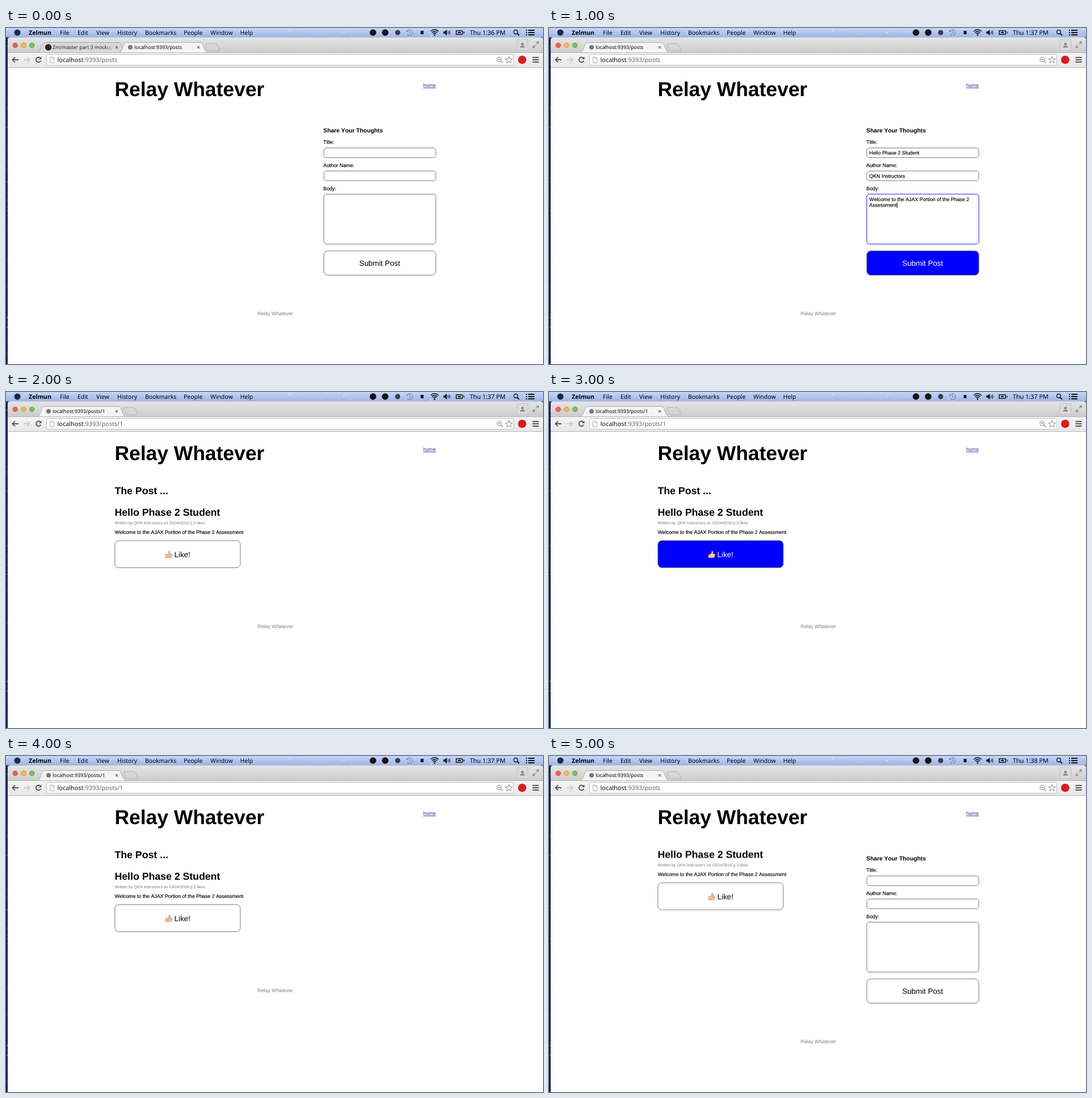
An HTML page that plays this animation: 946x592 px, repeating every 6 s.

```html
<!DOCTYPE html>
<html lang="en">
<head>
<meta charset="utf-8">
<title>Sharing a post</title>
<style>
  html, body { margin: 0; width: 100%; height: 100%; overflow: hidden; background: #fff; }
  svg { display: block; width: 946px; height: 592px; }
  text { text-rendering: geometricPrecision; font-kerning: none; }
  .ui { font: 10.4px "Noto Sans", "Open Sans", sans-serif; }
  .tab-text { font-size: 8.7px; }
  .url { font-size: 10.9px; fill: #666; }
  .url tspan { fill: #111; }
  .page { font: 8.86px "Liberation Sans", Arial, sans-serif; }
  .page text:not([class]) { stroke: #000; stroke-width: .18px; }
  .bold { font-weight: 700; }
  .h1 { font-size: 35.4px; }
  .h2 { font-size: 17.7px; }
  .h3 { font-size: 10.33px; }
  .button { font-size: 13.35px; }
  .meta { font-size: 7.08px; fill: #777; }
  .footer { fill: #7c7c7c; text-anchor: middle; }
  .link { fill: #551a8b; text-decoration: underline; }
  .box { fill: #fff; stroke: #777; }
  .line { fill: none; stroke: #111; }
</style>
</head>
<body>
<svg viewBox="0 0 946 592">
  <defs>
    <linearGradient id="menu" x2="0" y2="1">
      <stop stop-color="#c6d6f6"/><stop offset="1" stop-color="#9db4e6"/>
    </linearGradient>
    <linearGradient id="strip" x2="0" y2="1">
      <stop stop-color="#e6e6e6"/><stop offset="1" stop-color="#cccccc"/>
    </linearGradient>
    <linearGradient id="bar" x2="0" y2="1">
      <stop stop-color="#f4f4f4"/><stop offset="1" stop-color="#e8e8e8"/>
    </linearGradient>
    <linearGradient id="fade" gradientUnits="userSpaceOnUse" x1="176" x2="188">
      <stop stop-color="#222"/><stop offset="1" stop-color="#222" stop-opacity="0"/>
    </linearGradient>
    <path id="tab" d="M56 43C61 42.500 62 27 67 25.500H199C204 27 205 42.500 211 43"/>
    <path id="new-tab" d="M209 27.500H225Q228 28 229 31L232 38Q232 40 230 40H215Q212 40 211 37L207.500 29.500Q207 27.500 209 27.500Z" fill="#d6d6d6" stroke="#aaa" stroke-width=".8"/>
    <path id="close" d="M-2.200-2.200L2.200 2.200M2.200-2.200L-2.200 2.200" stroke="#666" stroke-width="1.200"/>
  </defs>

  <rect width="946" height="592" fill="#18244a"/>
  <g id="stars" fill="#fff"></g>
  <path d="M3 592V21Q3 16.500 8 16.500H941Q946 16.500 946 21V592Z" fill="#fff"/>

  <!-- menu bar -->
  <rect width="946" height="16.500" fill="url(#menu)"/>
  <g id="sparkles" fill="#fff"></g>
  <g class="ui" id="menu-items">
    <circle cx="20" cy="8" r="5.500" fill="#1c2944"/>
    <text x="40" y="11.800" class="bold" font-size="10.6">Zelmun</text>
    <text x="817" y="11.800" font-size="10.8" data-on="0">Thu 1:36 PM</text>
    <text x="817" y="11.800" font-size="10.8" data-on="1234">Thu 1:37 PM</text>
    <text x="817" y="11.800" font-size="10.8" data-on="5">Thu 1:38 PM</text>
  </g>
  <g fill="#111">
    <circle cx="646.500" cy="8" r="5.800"/>
    <circle cx="668" cy="8" r="5.800"/>
    <circle cx="690" cy="8" r="4.500" fill="#333c50"/>
    <rect x="730.500" y="5" width="5" height="6"/>
    <path d="M770.500 6H773L776.500 2.800V13.200L773 10H770.500Z"/>
    <path d="M792.500 4H803.500Q805 4 805 5.500V10.500Q805 12 803.500 12H792.500ZM806 6.500H807.500V9.500H806Z"/>
    <path d="M794 5.500H803.500V10.500H794Z" fill="#c4d1ee"/>
    <path d="M796 7H799V6L802 8L799 10V9H796Z"/>
    <circle cx="755" cy="12.500" r="1.300"/>
    <path d="M916 3H918V5H916ZM920 3H931V5H920ZM916 7H918V9H916ZM920 7H931V9H920ZM916 11H918V13H916ZM920 11H931V13H920Z"/>
  </g>
  <g class="line">
    <path d="M706.300 6A5.200 5.200 0 1 1 707 11.500M711 5V8.200L713.300 9.800M704.500 4.500L706.300 6.800L708.500 5.200" stroke="#66728f"/>
    <path d="M748 6Q755-.5 762 6M750.200 8.200Q755 3.800 759.800 8.200M752.400 10.300Q755 8 757.600 10.300" stroke-width="1.500"/>
    <path d="M778.500 6Q780 8 778.500 10M780.500 4.500Q783 8 780.500 11.500" stroke-width="1.200"/>
    <circle cx="898" cy="7" r="3.500" stroke-width="1.400"/>
    <path d="M900.500 9.500L904 13" stroke-width="1.800"/>
  </g>

  <!-- tab strip -->
  <path d="M3 43.500V21Q3 16.500 8 16.500H941Q946 16.500 946 21V43.500Z" fill="url(#strip)"/>
  <g stroke-width=".7">
    <circle cx="16.200" cy="30.500" r="4.300" fill="#ee6156" stroke="#b8443c"/>
    <circle cx="31" cy="30.500" r="4.300" fill="#f3b94d" stroke="#b98830"/>
    <circle cx="45.700" cy="30.500" r="4.300" fill="#74c455" stroke="#4c8f36"/>
  </g>
  <rect x="900.500" y="20.500" width="19" height="19" fill="#dcdcdc" stroke="#c3c3c3"/>
  <path d="M905.500 34.500Q905.500 31 909.800 31Q914 31 914 34.500Z" fill="#888"/>
  <circle cx="909.800" cy="28.300" r="2.300" fill="#888"/>
  <path d="M934 28.500L938 24.500M934.500 24.500H938V28M932.500 30.500L928.500 34.500M928.500 31V34.500H932" fill="none" stroke="#8b8b8b" stroke-width="1.300"/>
  <path d="M3 43.500H946" stroke="#b4b4b4"/>
  <g class="ui tab-text" data-on="0">
    <use href="#tab" fill="#d9d9d9" stroke="#aaa"/>
    <circle cx="74.500" cy="34" r="5.700" fill="#222"/>
    <text x="82" y="37" fill="url(#fade)">Zm/master part 3 mockup</text>
    <use href="#close" x="195" y="34"/>
  </g>
  <g id="active-tab" class="ui tab-text">
    <use href="#tab" fill="#f4f4f4" stroke="#aaa"/>
    <circle cx="75" cy="34" r="4" fill="#777"/>
    <text x="82" y="37" data-on="015">localhost:9393/posts</text>
    <text x="82" y="37" data-on="234">localhost:9393/posts/1</text>
    <use href="#close" x="195" y="34"/>
    <use href="#new-tab"/>
  </g>

  <!-- toolbar -->
  <rect x="3" y="44" width="943" height="25" fill="url(#bar)"/>
  <path d="M3 69.500H946" stroke="#b4b4b4"/>
  <rect x="71.500" y="46.500" width="823" height="19" rx="2" fill="#fff" stroke="#bdbdbd"/>
  <g fill="none" stroke="#555" stroke-width="1.900">
    <path d="M22 56H11.500M16 51.300L11.300 56L16 60.700"/>
    <path d="M31 56H41.500M37 51.300L41.700 56L37 60.700" stroke="#ccc"/>
    <path d="M61 53.500A4.400 4.400 0 1 0 61.400 57.500"/>
    <path d="M927.500 52H938.500M927.500 56H938.500M927.500 60H938.500"/>
  </g>
  <path d="M62.500 50.500V55H58Z" fill="#555"/>
  <path d="M77.500 51H82L85 54V61.500H77.500ZM82 51V54H85" fill="none" stroke="#aaa"/>
  <g fill="none" stroke="#888">
    <circle cx="868.800" cy="55.300" r="4"/><path d="M867 55.300H870.600M871.800 58.300L875 61.500" stroke-width="1.500"/>
    <path d="M886 50L887.800 54.100L892.200 54.500L888.900 57.400L889.900 61.700L886 59.400L882.100 61.700L883.100 57.400L879.800 54.500L884.200 54.100Z"/>
  </g>
  <circle cx="909.300" cy="56" r="7.300" fill="#d51f1b"/>
  <g class="ui">
    <text x="90.500" y="60" class="url" data-on="015"><tspan>localhost</tspan>:9393/posts</text>
    <text x="90.500" y="60" class="url" data-on="234"><tspan>localhost</tspan>:9393/posts/1</text>
  </g>

  <!-- page -->
  <g class="page">
    <text x="191.500" y="120" class="bold h1">Relay Whatever</text>
    <text x="735" y="104.200" class="link">home</text>

    <g data-on="015">
      <text x="559" y="183.700" class="bold h3">Share Your Thoughts</text>
      <text x="559" y="204.300">Title:</text>
      <rect class="box" x="559.800" y="211.300" width="197.400" height="17" rx="4.500"/>
      <text x="559" y="245">Author Name:</text>
      <rect class="box" x="559.800" y="252" width="197.400" height="17" rx="4.500"/>
      <text x="559" y="285.700">Body:</text>
      <rect class="box" id="body-box" x="559.800" y="292.700" width="197.400" height="88" rx="4.500"/>
      <rect class="box" id="submit-box" x="559.800" y="392.700" width="197.400" height="42.800" rx="7"/>
      <text id="submit-label" x="622.300" y="419" class="button">Submit Post</text>
      <g data-on="1">
        <text x="564.300" y="223.200">Hello Phase 2 Student</text>
        <text x="564.300" y="264">QKN Instructors</text>
        <text x="564.300" y="305">Welcome to the AJAX Portion of the Phase 2</text>
        <text x="564.300" y="315.300">Assessment</text>
        <path d="M613.300 307V317" stroke="#000" stroke-width=".9"/>
      </g>
      <text x="474.500" y="506.200" class="footer">Relay Whatever</text>
    </g>

    <g data-on="234">
      <text x="191.500" y="180" class="bold h2">The Post ...</text>
      <text x="474.500" y="416" class="footer">Relay Whatever</text>
    </g>

    <g id="post">
      <g data-on="2345">
        <text x="191.500" y="218.300" class="bold h2">Hello Phase 2 Student</text>
        <text x="191.500" y="233.200" class="meta" data-on="23">Written by QKN Instructors on 03/24/2016 || 0 likes</text>
        <text x="191.500" y="233.200" class="meta" data-on="45">Written by QKN Instructors on 03/24/2016 || 2 likes</text>
        <text x="191.500" y="250">Welcome to the AJAX Portion of the Phase 2 Assessment</text>
        <rect class="box" id="like-box" x="191.800" y="261.800" width="221" height="47.800" rx="7"/>
        <path id="thumb" d="M281 286.300H284Q286.800 284.300 287 280.800Q287.300 279.800 288.500 280.400Q289.800 281.600 288.700 285.300H291.700Q293 286 292.200 287.300Q292.800 288.500 291.800 289.200Q292 290.500 291 290.800Q290.800 292 289.500 292H281Z" fill="#e9bd97" stroke="#b07f5b" stroke-width=".7"/>
        <text id="like-label" x="296.500" y="290.900" class="button">Like!</text>
      </g>
    </g>
  </g>
</svg>

<script>
const STEPS = [0, 1, 2, 3, 4, 5];
const STEP_MS = 1000;
const $ = selector => document.querySelector(selector);

function svg(parent, tag, attrs, text = '') {
  const el = document.createElementNS(parent.namespaceURI, tag);
  for (const name in attrs) el.setAttribute(name, attrs[name]);
  el.textContent = text;
  parent.append(el);
}

// Holds one value per step, with a hard change between steps.
function track(el, property, valueAt) {
  const count = STEPS.length;
  const frames = STEPS.map(step => ({
    [property]: valueAt(step), offset: step / count, easing: 'steps(1, end)'
  }));
  frames.push({ [property]: valueAt(count - 1), offset: 1 });
  el.animate(frames, { duration: count * STEP_MS, iterations: Infinity });
}

function highlight(selector, property, step, active, normal) {
  track($(selector), property, s => s === step ? active : normal);
}

let seed = 7;
const random = () => (seed = seed * 16807 % 2147483647) / 2147483647;

function scatter(parent, count, x, width, height, opacity) {
  for (let i = 0; i < count; i++) {
    svg(parent, 'circle', {
      cx: x + random() * width, cy: random() * height,
      r: 0.4 + random() * 0.8, opacity: random() * opacity
    });
  }
}
scatter($('#stars'), 40, 0, 3, 592, 0.4);
scatter($('#sparkles'), 90, 420, 400, 16, 0.6);

const menu = { File: 95, Edit: 126, View: 159, History: 196, Bookmarks: 245, People: 313, Window: 360, Help: 412.5 };
for (const label in menu) svg($('#menu-items'), 'text', { x: menu[label], y: 11.8 }, label);

for (const el of document.querySelectorAll('[data-on]')) {
  track(el, 'opacity', step => el.dataset.on.includes(step) ? 1 : 0);
}
track($('#active-tab'), 'transform', step => `translateX(${step === 0 ? 144 : 0}px)`);
track($('#post'), 'transform', step => `translateY(${step === 5 ? -38.5 : 0}px)`);

highlight('#body-box', 'stroke', 1, '#2020e8', '#777');
highlight('#submit-box', 'fill', 1, '#0000ff', '#fff');
highlight('#submit-label', 'fill', 1, '#fff', '#000');
highlight('#like-box', 'fill', 3, '#0000ff', '#fff');
highlight('#like-label', 'fill', 3, '#fff', '#000');
highlight('#thumb', 'fill', 3, '#f6d48f', '#e9bd97');
</script>
</body>
</html>
```
